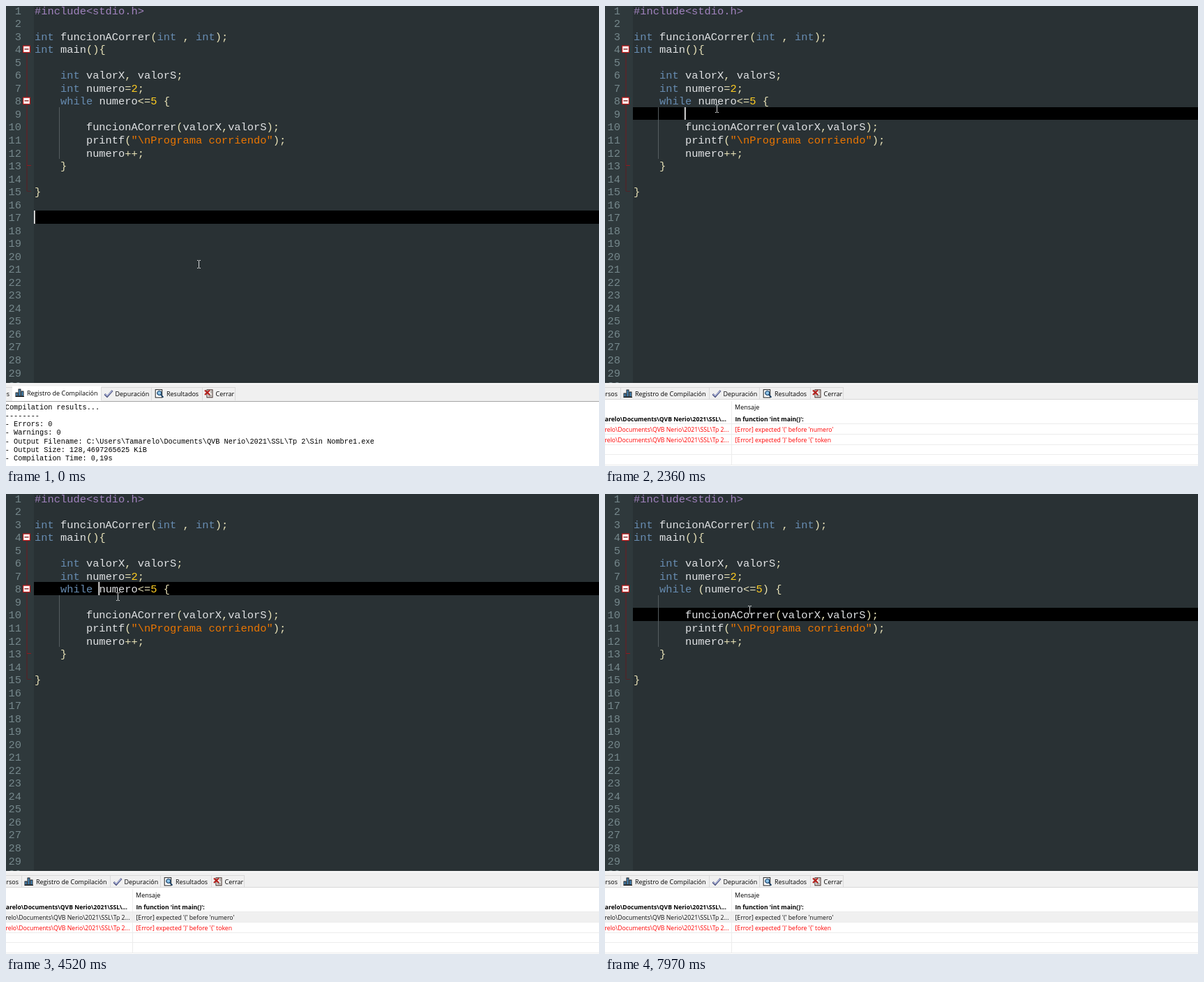
Write an HTML page that moves like this. It is 850 px wide and 659 px high and loops after 8000 ms.

```html
<!DOCTYPE html>
<html lang="es">
<head>
<meta charset="utf-8">
<title>Editor</title>
<style>
html, body { margin: 0; width: 100%; height: 100%; overflow: hidden; background: #293134; }
svg { display: block; width: 100%; height: 100%; }
text { white-space: pre; }
.code { font: 15.4px "Liberation Mono", monospace; }
.log { font: 10.25px "Liberation Mono", monospace; }
.ui { font: 9px "Open Sans", sans-serif; }
.msg { font: 8.7px "Open Sans", sans-serif; }
.bold { font: bold 8.6px "Open Sans", sans-serif; }
</style>
</head>
<body>
<svg id="stage" viewBox="0 0 850 659"></svg>
<script>
const LOOP = 8000, X0 = 41, CW = 9.24, ROW = 18.53, Y0 = -3.4;
const NS = 'http://www.w3.org/2000/svg';
const stage = document.getElementById('stage');
const C = {
  plain: '#e0e2e4', type: '#678cb1', pre: '#a082bd', num: '#ffcd22',
  str: '#ec7600', sym: '#e8e2b7', red: '#d81313'
};

function add(parent, tag, attrs = {}, text) {
  const el = document.createElementNS(NS, tag);
  for (const k in attrs) el.setAttribute(k, attrs[k]);
  if (text !== undefined) el.textContent = text;
  parent.appendChild(el);
  return el;
}
const rect = (p, x, y, width, height, fill, more = {}) => add(p, 'rect', { x, y, width, height, fill, ...more });
const path = (p, d, stroke, more = {}) => add(p, 'path', { d, stroke, fill: 'none', ...more });
const label = (p, x, y, cls, s, fill = '#000', more = {}) => add(p, 'text', { x, y, class: cls, fill, ...more }, s);
const group = p => add(p, 'g');
const show = (el, on) => el.setAttribute('display', on ? 'inline' : 'none');

const rowTop = n => Math.round(Y0 + (n - 1) * ROW);
const baseline = n => Math.round(Y0 + (n - 1) * ROW + 15.1);
const colX = c => X0 + c * CW;

const TOKEN = /(#.*)|("[^"]*")|\b(int|while)\b|\b(\d+)\b|(\w+)|([^\w\s"]+)|\s+/g;
const KINDS = ['pre', 'str', 'type', 'num', 'plain', 'sym'];

function fillLine(el, src, mode) {
  el.textContent = '';
  for (const m of src.matchAll(TOKEN)) {
    const kind = KINDS[m.slice(1).findIndex(v => v !== undefined)] || 'plain';
    if (mode === 'match' && kind === 'sym') {
      for (const ch of m[0]) add(el, 'tspan', { fill: '()'.includes(ch) ? '#000' : C.sym }, ch);
    } else {
      add(el, 'tspan', { fill: mode === 'error' ? '#fff' : C[kind] }, m[0]);
    }
  }
}

// Editor
rect(stage, 0, 0, 850, 541, '#293134');
rect(stage, 0, 0, 40, 541, '#2f393c');
const bar = rect(stage, 40, 0, 810, 18, '#000');
const selection = rect(stage, colX(10), rowTop(8), 0, 19, '#404e51');
const braces = [0, 1].map(() => rect(stage, 0, rowTop(8), CW, 19, C.sym));

for (let n = 1; n <= 30; n++)
  label(stage, 22, baseline(n), 'code', n, '#75878b', { 'text-anchor': 'end' });

path(stage, 'M30 67V228', '#741a1e');
path(stage, 'M30 228V265', '#5e1c20');
path(stage, 'M30 228.5H36', '#8e1b1f');
path(stage, 'M30 265.5H36', '#4c2428');
for (const n of [4, 8]) {
  const y = rowTop(n) + 5;
  rect(stage, 24.6, y + .1, 9.8, 9.4, '#fff', { stroke: '#c01818', 'stroke-width': 1.2 });
  path(stage, `M26.5 ${y + 4.8}h6`, '#7a1010', { 'stroke-width': 1.3 });
}
path(stage, 'M76.5 145V219', '#555d60');

const source = {
  1: '#include<stdio.h>',
  3: 'int funcionACorrer(int , int);',
  4: 'int main(){',
  6: '    int valorX, valorS;',
  7: '    int numero=2;',
  8: '',
  10: '        funcionACorrer(valorX,valorS);',
  11: '        printf("\\nPrograma corriendo");',
  12: '        numero++;',
  13: '    }',
  15: '}'
};
const lines = {};
for (const n in source) {
  lines[n] = label(stage, X0, baseline(+n), 'code', '');
  fillLine(lines[n], source[n]);
}

const errorMark = group(stage);
rect(errorMark, 10, 131.5, 8.5, 9, '#b51212', { rx: 2 });
path(errorMark, 'M12 133.5l4.5 5M16.5 133.5l-4.5 5', '#1a0505', { 'stroke-width': 1.7 });

const caret = rect(stage, 0, 0, 1.6, 18, '#fff');

// Lower panel
const panel = group(stage);
rect(panel, 0, 540, 850, 119, '#f0f0f0');
rect(panel, 0, 541, 850, 1, '#fafafa');

function drawIcon(p, kind, x, y) {
  const g = add(p, 'g', { transform: `translate(${x} ${y})` });
  if (kind === 'bars') {
    [[.5, 6], [4.5, 1], [8.5, 4]].forEach(([bx, by]) =>
      rect(g, bx, by, 3, 11 - by, '#4f8fc0', { stroke: '#111', 'stroke-width': .9 }));
    path(g, 'M0 11.5H12.5', '#111');
  } else if (kind === 'check') {
    path(g, 'M1 7L4.5 10.5L12 2', '#3c4270', { 'stroke-width': 2.5 });
    path(g, 'M1.5 7L4.5 9.7L11.5 2.3', '#b9c2ea', { 'stroke-width': 1.2 });
  } else if (kind === 'find') {
    rect(g, .7, .6, 9.5, 11.3, '#fff', { stroke: '#222', 'stroke-width': 1 });
    add(g, 'circle', { cx: 6.3, cy: 5.5, r: 3, fill: '#8fc4e8', stroke: '#163f66', 'stroke-width': 1.2 });
    path(g, 'M8.5 8L12 11.7', '#163f66', { 'stroke-width': 1.8 });
  } else {
    rect(g, 4, .8, 8, 11, '#f7f3ee', { stroke: '#3c2a26', 'stroke-width': 1 });
    path(g, 'M6 8.5H10.5M6 10H10.5M9 3H11M9 5H11', '#666', { 'stroke-width': .8 });
    path(g, 'M1 1.5L8 8M8 1.5L1 8', '#b3201c', { 'stroke-width': 2.3 });
  }
}

const tabs = [
  ['bars', 13.5, 30, 'Registro de Compilación', 136.5],
  ['check', 140.5, 156.5, 'Depuración', 208.5],
  ['find', 213.5, 230, 'Resultados', 281.5],
  ['close', 284, 300.5, 'Cerrar', 328.5]
];

function drawTabs(p, shift, active) {
  path(p, `M0 546.5H${329 + shift}M${9.5 + shift} 546V565`, '#d9d9d9');
  if (active) rect(p, 9, 544.5, 127.5, 21.5, '#fff');
  label(p, 5 + shift, 559, 'ui', 'Recursos', '#000', { 'text-anchor': 'end' });
  tabs.forEach(([kind, ix, tx, name, edge], i) => {
    const lift = active && !i ? 1 : 0;
    drawIcon(p, kind, ix + shift, 549 - lift);
    label(p, tx + shift, 559 - lift, 'ui', name);
    path(p, `M${edge + shift} 546V565`, '#d9d9d9');
  });
}

const logView = group(panel);
rect(logView, 0, 566, 850, 93, '#fff');
path(logView, 'M0 566.5H850', '#a5a5a5');
drawTabs(logView, 0, true);
[
  'Compilation results...',
  '--------',
  '- Errors: 0',
  '- Warnings: 0',
  '- Output Filename: C:\\Users\\Tamarelo\\Documents\\QVB Nerio\\2021\\SSL\\Tp 2\\Sin Nombre1.exe',
  '- Output Size: 128,4697265625 KiB',
  '- Compilation Time: 0,19s'
].forEach((s, i) => label(logView, -1.2, Math.round(577.5 + i * 12.3), 'log', s));

const errorView = group(panel);
drawTabs(errorView, 13, false);
rect(errorView, 0, 564, 850, 95, '#fff');
path(errorView, 'M0 563.5H850', '#d9d9d9');
const pickedRow = rect(errorView, 0, 599, 850, 14.5, '#f0f0f0');
path(errorView, 'M0 598.5H850M0 613.5H850M0 628.5H850M0 642.5H850M0 657.5H850M181.5 566V657', '#ececec');
label(errorView, 186, 578, 'ui', 'Mensaje');
const folder = 'C:\\Users\\Tamarelo\\Documents\\QVB Nerio\\2021\\SSL\\';
const END = { 'text-anchor': 'end' };
label(errorView, 174, 595, 'bold', folder + '...', '#000', END);
label(errorView, 186.5, 595, 'bold', "In function 'int main()':");
const errorRow = (y, s) => [
  label(errorView, 177.5, y, 'msg', folder + 'Tp 2...', '#f00', END),
  label(errorView, 186.5, y, 'msg', s, '#f00')
];
const firstError = errorRow(610, "[Error] expected '(' before 'numero'");
errorRow(624.5, "[Error] expected ')' before '{' token");

const pointer = path(stage, 'M-2.5 -5.5H-.8L0 -4.8L.8 -5.5H2.5M0 -4.8V4.8M-2.5 5.5H-.8L0 4.8L.8 5.5H2.5', '#d4d6d7');

// Timelines: each entry holds from its time until the next one
const JUMP = 2400;
const rows = [[0, 17], [1490, 9], [JUMP, 8], [7860, 10]];
const modes = [[0, ''], [JUMP, 'error'], [4180, ''], [5590, 'match'], [7860, '']];
const conditions = [[0, 'numero<=5'], [5250, ''], [5590, '()'], [6300, '(numero<=5)']];
const selected = [[0, 0], [4620, 6], [4800, 8], [4980, 9], [5250, 0]];
const carets = [
  [0, 0], [250, -1], [780, 0], [1310, -1], [1490, 8], [2020, -1], [2220, 8],
  [JUMP, 10], [2900, -1], [3430, 10], [3960, -1], [4180, 10], [4620, 16], [4800, 18],
  [4980, 19], [5250, 10], [5590, 11], [6120, -1], [6300, 20], [6830, -1], [7360, 20], [7860, -1]
];
const moves = [
  [0, 276.5, 370], [520, 276.5, 370], [1070, 232, 246], [1330, 161, 146], [2000, 161, 146],
  [2220, 160, 147], [6660, 160, 147], [6900, 161, 146.5], [7180, 161, 146.5], [7640, 207, 166]
];

function at(list, t) {
  let value;
  for (const [start, v] of list) if (t >= start) value = v;
  return value;
}

function pointerAt(t) {
  const i = moves.findIndex(m => m[0] > t);
  if (i < 0) return moves[moves.length - 1].slice(1);
  const [a, ax, ay] = moves[i - 1], [b, bx, by] = moves[i];
  const u = (t - a) / (b - a), e = u * u * (3 - 2 * u);
  return [ax + (bx - ax) * e, ay + (by - ay) * e];
}

function render(t) {
  const row = at(rows, t), mode = at(modes, t), cond = at(conditions, t);
  const top = rowTop(row), height = rowTop(row + 1) - top;
  bar.setAttribute('y', top);
  bar.setAttribute('height', height);
  bar.setAttribute('fill', mode === 'error' ? C.red : '#000');
  show(errorMark, mode === 'error');
  fillLine(lines[8], `    while ${cond} {`, mode);

  selection.setAttribute('width', at(selected, t) * CW);
  braces.forEach((b, i) => {
    show(b, mode === 'match');
    b.setAttribute('x', colX(10 + i * (cond.length - 1)));
  });

  const col = at(carets, t);
  show(caret, col >= 0);
  caret.setAttribute('x', colX(col) - .9);
  caret.setAttribute('y', top);
  caret.setAttribute('height', height);
  caret.setAttribute('fill', mode === 'error' ? '#f0c8c8' : '#fff');

  show(logView, t < 2220);
  show(errorView, t >= 2220);
  show(pickedRow, t >= JUMP);
  firstError.forEach(el => el.setAttribute('fill', t >= JUMP ? '#111' : '#f00'));

  const [x, y] = pointerAt(t);
  pointer.setAttribute('transform', `translate(${Math.floor(x) + .5} ${Math.round(y)})`);
}

const begin = performance.now();
function tick() {
  render((performance.now() - begin) % LOOP);
  requestAnimationFrame(tick);
}
tick();
</script>
</body>
</html>
```
